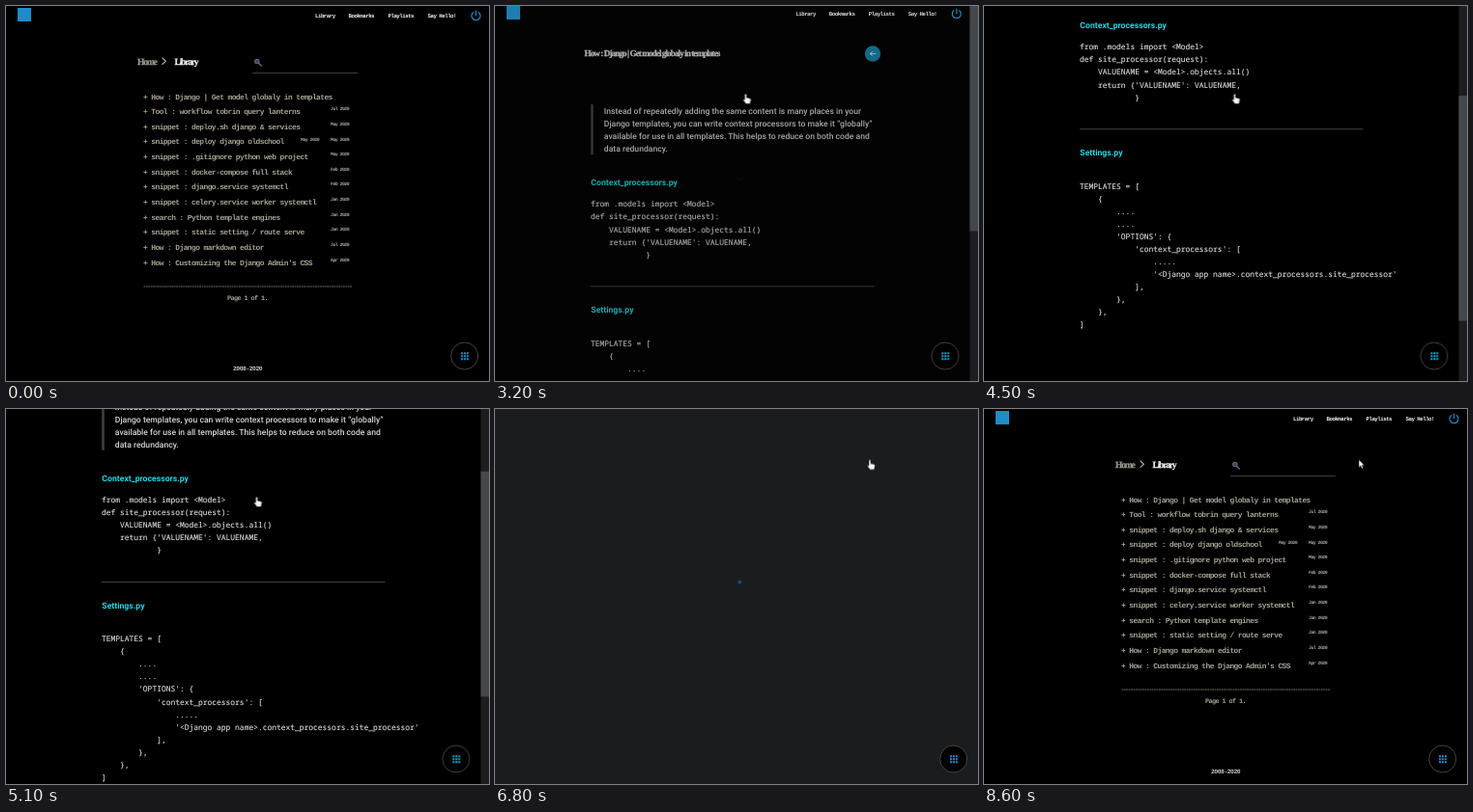
Write an HTML page that moves like this. It is 500x389 px and loops after 8.7 s.

```html
<!DOCTYPE html>
<html lang="en">
<head>
<meta charset="utf-8">
<title>Snippet library</title>
<style>
html, body { margin: 0; width: 100%; height: 100%; overflow: hidden; background: #000; }
svg { display: block; width: 500px; height: 389px; }
text { white-space: pre; text-rendering: geometricPrecision; }

.mono { font-family: "Liberation Mono", monospace; font-weight: 700; }
.nav { font-size: 5.8px; letter-spacing: -.53px; fill: #f6f6f6; }
.row { font-size: 7.9px; letter-spacing: -.57px; fill: #a8a294; }
.date { font-size: 4.9px; letter-spacing: -.54px; fill: #a8a49a; }
.page { font-size: 6.8px; letter-spacing: -.58px; fill: #a8a294; }
.year { font-size: 6.4px; letter-spacing: -.49px; fill: #c8c8c8; }
.head, .title { font-family: "Liberation Serif", serif; font-weight: 700; stroke-width: .3; }
.head { font-size: 9.6px; letter-spacing: -1.25px; fill: #eee; stroke: #eee; }
.head.dim { fill: #96948c; stroke: #96948c; }
.title { font-size: 9.2px; letter-spacing: -.95px; fill: #ddd; stroke: #ddd; }
.quote { font: 500 8.6px Roboto, sans-serif; fill: #d6d6d6; }
.sub { font: 700 8.7px Roboto, sans-serif; fill: #22d8e4; }
.code { font: 500 7.95px "Noto Sans Mono", monospace; fill: #dedede; stroke: #dedede; stroke-width: .12; }
.line { fill: none; stroke-linecap: round; }

.list, .article, .drop, .slide, .shift, .scroll, .thumb, .loader, .cursor, .hand, .arrow {
  animation: 8.7s linear infinite;
}
.list { animation-name: list; animation-timing-function: step-end; }
.article { animation-name: article; animation-timing-function: step-end; }
.shift { animation-name: shift; animation-timing-function: step-end; }
.hand { animation-name: hand; animation-timing-function: step-end; }
.arrow { animation-name: arrow; animation-timing-function: step-end; }
.slide { --from: -48px; animation-name: drop, appear; }
.drop { --from: -16px; animation-name: drop; }
.scroll { --end: -172px; --near: -169px; animation-name: scroll; }
.thumb { --end: 95px; --near: 93px; animation-name: scroll; }
.loader { animation-name: loader; }
.cursor { animation-name: cursor; }

@keyframes list { 0%, 78.161% { visibility: visible } 31.034% { visibility: hidden } }
@keyframes article { 0%, 78.161% { visibility: hidden } 31.034% { visibility: visible } }
@keyframes shift {
  0%, 78.161%, 100% { transform: none; color: #1f88c9 }
  31.034% { transform: translateX(-8.7px); color: #1c9cc2 }
}
@keyframes hand { 0%, 61.5%, 81.6% { visibility: hidden } 24%, 65.5% { visibility: visible } }
@keyframes arrow { 0%, 61.5%, 81.6% { visibility: visible } 24%, 65.5% { visibility: hidden } }
@keyframes drop {
  0%, 31.033%, 40.23%, 78.16%, 87.356%, 100% { transform: none }
  31.034%, 33.333%, 78.161%, 80.46% {
    transform: translateY(var(--from));
    animation-timing-function: cubic-bezier(.215, .61, .355, 1);
  }
}
@keyframes appear {
  0%, 31.033%, 40.23%, 78.16%, 87.356%, 100% { opacity: 1 }
  31.034%, 33.333%, 78.161%, 80.46% {
    opacity: 0;
    animation-timing-function: cubic-bezier(.215, .61, .355, 1);
  }
}
@keyframes loader {
  0%, 31.033%, 40.23%, 78.16%, 87.356%, 100% { opacity: 0 }
  31.034%, 33.333%, 78.161%, 80.46% {
    opacity: 1;
    animation-timing-function: cubic-bezier(.215, .61, .355, 1);
  }
}
@keyframes scroll {
  0%, 41.379% { transform: none; animation-timing-function: cubic-bezier(.4, .1, .5, 1) }
  51.724% { transform: translateY(var(--near)) }
  54.023% { transform: translateY(var(--end)) }
  56.322% { transform: translateY(var(--end)); animation-timing-function: cubic-bezier(.4, .1, .5, 1) }
  63.218%, 100% { transform: none }
}
@keyframes cursor {
  0%, 10.344% { opacity: 0; transform: translate(400px, 300px) }
  10.345% { opacity: 1; transform: translate(400px, 300px); animation-timing-function: ease-in-out }
  26.437% { opacity: 1; transform: translate(259.5px, 91px) }
  60.345% { opacity: 1; transform: translate(259.5px, 91px); animation-timing-function: ease-in-out }
  66.667%, 77% { opacity: 1; transform: translate(386px, 53px) }
  78.161%, 100% { opacity: 1; transform: translate(388px, 52.5px) }
}
</style>
</head>
<body>
<svg viewBox="0 0 500 389">
  <rect width="500" height="389"/>

  <g class="scroll"><g class="drop">
    <rect x="12" y="2" width="14" height="14" fill="#1f8cc9"/>
    <g class="shift">
      <g class="mono nav">
        <text x="320" y="12">Library</text>
        <text x="354.5" y="12">Bookmarks</text>
        <text x="395.5" y="12">Playlists</text>
        <text x="436.5" y="12">Say Hello!</text>
      </g>
      <path class="line" d="M483.6 6.7A4.5 4.5 0 1 0 489.4 6.7M486.5 5V9.8" stroke="currentColor" stroke-width="1.2"/>
    </g>
  </g></g>

  <g class="list"><g class="slide">
    <text class="head dim" x="136" y="60.5">Home</text>
    <path class="line" d="M162 54l3.4 3.2-3.4 3.2" stroke="#aaa" stroke-width="1.2"/>
    <text class="head" x="174.5" y="60.5">Library</text>
    <g class="line" stroke="#5d6872">
      <circle cx="259.8" cy="57.6" r="2.2" fill="#33495c" stroke-width="1.1"/>
      <path d="M261.6 59.4l2.6 2.6" stroke-width="1.5"/>
    </g>
    <path d="M255 69.5H364" stroke="#4c4c4c" stroke-width=".8"/>
    <g id="rows" class="mono row"></g>
    <g id="dates" class="mono date"><text x="305" y="139.6">May 2020</text></g>
    <path d="M142.5 291H358" stroke="#8a867c" stroke-width=".8" stroke-dasharray="1.9 .5"/>
    <text class="mono page" x="229" y="304.7">Page 1 of 1.</text>
    <text class="mono year" x="235" y="378">2008-2020</text>
  </g></g>

  <g class="article"><g class="scroll"><g class="slide">
    <text class="title" x="92.5" y="57.5">How : Django | Get model globaly in templates</text>
    <circle cx="391" cy="55.5" r="8.2" fill="#1585ad"/>
    <path class="line" d="M394 55.5h-5.6m2.3-2.3l-2.3 2.3 2.3 2.3" stroke="#cfe6ee"/>
    <path d="M100.5 108V160" stroke="#3f3f3f" stroke-width="2.6"/>
    <g id="quote" class="quote"></g>
    <text class="sub" x="99.3" y="192.3">Context_processors.py</text>
    <g id="models" class="code"></g>
    <path d="M99 296.8H392.5" stroke="#4a4a4a" stroke-width=".9"/>
    <text class="sub" x="99.3" y="324">Settings.py</text>
    <g id="settings" class="code"></g>
  </g></g></g>

  <g class="loader">
    <rect width="500" height="389" fill="#1b1c1e"/>
    <circle cx="253.5" cy="179.5" r="2" fill="#164a78"/>
  </g>

  <g class="article">
    <rect x="491.5" width="8.5" height="389" fill="#1d1d1f"/>
    <rect class="thumb" x="491.5" width="8.5" height="233.5" fill="#45484b"/>
  </g>

  <g class="shift">
    <circle cx="474.7" cy="363" r="14" stroke="#4a4a4a" stroke-width=".9"/>
    <path d="M471 360.2h8M471 363.2h8M471 366.2h8" stroke="currentColor" stroke-width="2.1" stroke-dasharray="2.1 .8"/>
  </g>

  <g class="cursor" stroke="#000" stroke-width=".5" fill="#f2f2f2">
    <path class="arrow" d="M0 0V8.2L1.9 6.5 3.2 9.4 4.6 8.8 3.4 5.9H6z"/>
    <path class="hand" d="M-1 .8Q0-.8 1 .8V4L4.2 4.7Q5.6 5 5.4 6.4L4.6 10.4H.2L-2.7 6.6Q-2.9 5.2-1 6.2z"/>
  </g>
</svg>
<script>
const addLines = (id, x, y, pitch, lines) => lines.forEach((line, i) => {
  const text = document.createElementNS("http://www.w3.org/2000/svg", "text");
  text.setAttribute("x", x);
  text.setAttribute("y", y + i * pitch);
  text.textContent = line;
  document.getElementById(id).append(text);
});

addLines("rows", 142, 96.6, 15.63, [
  "How : Django | Get model globaly in templates",
  "Tool : workflow tobrin query lanterns",
  "snippet : deploy.sh django & services",
  "snippet : deploy django oldschool",
  "snippet : .gitignore python web project",
  "snippet : docker-compose full stack",
  "snippet : django.service systemctl",
  "snippet : celery.service worker systemctl",
  "search : Python template engines",
  "snippet : static setting / route serve",
  "How : Django markdown editor",
  "How : Customizing the Django Admin's CSS"
].map(name => "+ " + name));

addLines("dates", 336, 108.3, 15.63,
  "Jul May May May Feb Feb Jan Jan Jan Jul Apr".split(" ").map(month => month + " 2020"));

addLines("quote", 112.8, 117.8, 13.1, [
  "Instead of repeatedly adding the same content is many places in your",
  "Django templates, you can write context processors to make it “globally”",
  "available for use in all templates. This helps to reduce on both code and",
  "data redundancy."
]);

addLines("models", 99, 214.4, 13.05, [
  "from .models import <Model>",
  "def site_processor(request):",
  "    VALUENAME = <Model>.objects.all()",
  "    return {'VALUENAME': VALUENAME,",
  "            }"
]);

addLines("settings", 99, 358.6, 13.03, [
  "TEMPLATES = [",
  "    {",
  "        ....",
  "        ....",
  "        'OPTIONS': {",
  "            'context_processors': [",
  "                .....",
  "                '<Django app name>.context_processors.site_processor'",
  "            ],",
  "        },",
  "    },",
  "]"
]);
</script>
</body>
</html>
```
